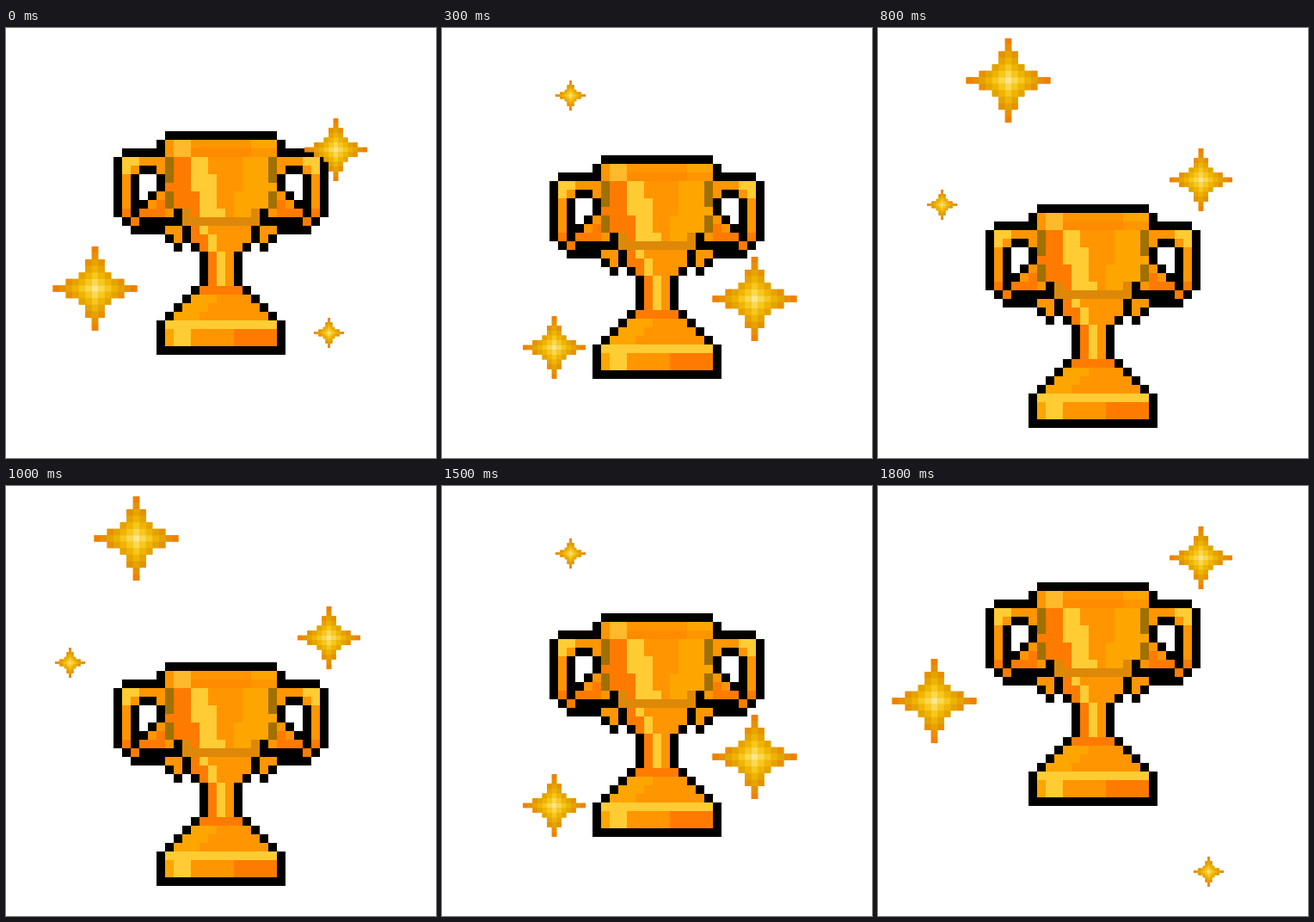
These frames come from a looping animation (500 px wide and 500 px high, 1900 ms). An HTML page:

```html
<!DOCTYPE html>
<html lang="en">
<head>
<meta charset="utf-8">
<title>Pixel trophy</title>
<style>
html, body { margin: 0; width: 100%; height: 100%; overflow: hidden; background: #fff; }
svg { display: block; width: 100vw; height: 100vh; }
</style>
</head>
<body>
<svg id="stage" viewBox="0 0 500 500"></svg>
<script>
const stage = document.getElementById('stage');

function add(parent, tag, attrs = {}) {
  const el = document.createElementNS('http://www.w3.org/2000/svg', tag);
  for (const k in attrs) el.setAttribute(k, attrs[k]);
  return parent.appendChild(el);
}

// Fills unit cells, one path per colour; color(x, y) may return nothing.
function paintCells(parent, [x0, x1], [y0, y1], color) {
  const paths = {};
  for (let y = y0; y <= y1; y++) {
    for (let x = x0; x <= x1; x++) {
      const fill = color(x, y);
      if (fill) paths[fill] = (paths[fill] || '') + `M${x} ${y}h1v1h-1z`;
    }
  }
  for (const fill in paths) add(parent, 'path', { d: paths[fill], fill });
}

const INK = '#000', BASE = '#ff9500', AMBER = '#ffa500', DEEP = '#ff7b00',
      GOLD = '#ffcc33', OLIVE = '#a07000', BAND = '#dd8808',
      RIM = '#ffb92b', RIM_SHADE = '#ff8c00';

// Trophy geometry: c and r are column and row, d the distance from the axis.
const AXIS = 12, FOOT = 25;

function halfWidth(r) {
  if (r < 1 || r >= FOOT) return -1;
  if (r < 9) return 6;
  if (r < 14) return 1 + Math.ceil((15 - r) / 2);
  return r < 18 ? 1 : Math.min(6, r - 16);
}

const inHole = (d, r) => r > 4 && r < 8 && d < 10 && d >= Math.max(8, r + 2);

const inHandle = (d, r) =>
  (r > 2 && r < 10 && d > 5 && d < 12) ||
  (r === 10 && d === 10) ||
  (r > 10 && d > 4 && d + r < 18);

const solid = (d, r) => d <= halfWidth(r) || inHandle(d, r);

function isInk(d, r) {
  const near = test => test(d - 1, r) || test(d + 1, r) || test(d, r - 1) || test(d, r + 1);
  const strap = d === 10 && r > 4 && r < 10;
  const underside = r === 11 && d > 6 && d < 11;
  const sole = r === FOOT && d < 8;
  return strap || underside || sole || (solid(d, r) ? near(inHole) : near(solid));
}

// Left of the shine is dark, right of it the given colour.
const shine = (c, from, to, right) => c < from ? DEEP : c <= to ? GOLD : right;

function shade(c, r, d) {
  if (d > 6) {
    if (r < 5 && d + 3 > 9 + r) return GOLD;
    return r > 8 || d + r === 15 ? DEEP : BASE;
  }
  if (r < 3) {
    if (c < 7) return BASE;
    if (c < 9) return RIM;
    if (c > 15) return r === 1 ? AMBER : BASE;
    return r === 1 ? BASE : RIM_SHADE;
  }
  if (r < 10) {
    if (d === 6 && r === 9) return BASE;
    if (d === 6 && r !== 6) return OLIVE;
    if (d === 4 && r === 9) return BAND;
    const slant = Math.floor((r - 3) / 2);
    const right = c >= (slant > 1 ? 14 : 15) ? AMBER : BASE;
    return shine(c, 9 + Math.floor(slant / 2), 10 + Math.ceil(slant / 2), right);
  }
  if (r === 10) return BAND;
  if (d > 4) return r < 18 ? BASE : footShade(c, r);
  if (r < 18) {
    const x = Math.min(12, 10 + Math.ceil((r - 11) / 2));
    return shine(c, x, x, BASE);
  }
  return footShade(c, r);
}

function footShade(c, r) {
  if (r === 18) return DEEP;
  if (r < 22) return c <= 30 - r ? AMBER : BASE;
  if (r === 22) return GOLD;
  if (c < 7) return AMBER;
  if (c < 9) return GOLD;
  return c < 14 ? BASE : DEEP;
}

function trophyColor(c, r) {
  const d = Math.abs(c - AXIS);
  if (inHole(d, r)) return null;
  if (isInk(d, r)) return INK;
  return solid(d, r) ? shade(c, r, d) : null;
}

const GLOW = ['#ffe68c', '#fbd850', '#f6c81e', '#f0b400', '#e4a400', '#e89000', '#f08000'];

function starColor(x, y) {
  const long = Math.max(Math.abs(x), Math.abs(y));
  const short = Math.min(Math.abs(x), Math.abs(y));
  const inside = short === 0 || (short === 1 && long < 5) || long < 3;
  return inside ? GLOW[long + short] : null;
}

function makeStar(cell, keys) {
  const el = add(stage, 'g');
  const art = add(el, 'g', { transform: 'translate(-.5 -.5)' });
  // A backing of one tone hides hairline gaps between cells.
  paintCells(art, [-6, 6], [-6, 6], (x, y) => starColor(x, y) && GLOW[4]);
  paintCells(art, [-6, 6], [-6, 6], starColor);
  return { el, cell, keys };
}

// Smooth curve through [step, x, y] keys.
function along(keys, s) {
  let i = 0;
  while (i < keys.length - 2 && s > keys[i + 1][0]) i++;
  const a = keys[i], b = keys[i + 1];
  const span = b[0] - a[0], u = (s - a[0]) / span;
  const slope = (n, k) => {
    const p = keys[Math.max(0, n - 1)], q = keys[Math.min(keys.length - 1, n + 1)];
    return (q[k] - p[k]) / (q[0] - p[0]) * span;
  };
  const u2 = u * u, u3 = u2 * u;
  return [1, 2].map(k =>
    a[k] * (2 * u3 - 3 * u2 + 1) + b[k] * (3 * u2 - 2 * u3) +
    slope(i, k) * (u3 - 2 * u2 + u) + slope(i + 1, k) * (u3 - u2));
}

const trophy = add(stage, 'g', { 'shape-rendering': 'crispEdges' });
paintCells(trophy, [0, 24], [0, FOOT], trophyColor);

const stars = [
  makeStar(5.6, [
    [0, 375.5, 83.5], [1, 383.5, 141.5], [2, 420, 260], [3, 292, 442],
    [4, 130.5, 371.5], [7, 149.5, 99.5], [10, 375.5, 176.5], [11, 411, 240]
  ]),
  makeStar(7.54, [
    [0, 65.5, 250], [1, 103.5, 303], [4, 363.5, 315],
    [7, 390.5, 288], [10, 151.5, 61], [11, 90, 100]
  ]),
  makeStar(2.7, [
    [0, 384.5, 448.5], [1, 375.5, 354.5], [4, 149.5, 78.5],
    [7, 40.5, 351.5], [10, 74.5, 205.5], [11, 92, 150]
  ])
];

const TICK = 100, TICKS = 19, TURN = 11;

// Steps run down and back up, with one step dropped every five ticks.
function stepAt(tick) {
  const n = (tick + 1 + Math.max(0, Math.floor((tick - 2) / 5))) % (2 * TURN);
  return n > TURN ? 2 * TURN - n : n;
}

// Nearly even travel that slows a little at both ends.
function lift(step) {
  const bend = 0.7, u = 2 * step / TURN - 1;
  return Math.round(162.8 + 50.5 * Math.sin(bend * u) / Math.sin(bend));
}

function draw(ms) {
  const step = stepAt(Math.floor(ms / TICK) % TICKS);
  trophy.setAttribute('transform', `translate(125 ${lift(step)}) scale(10)`);
  for (const { el, cell, keys } of stars) {
    const [x, y] = along(keys, step);
    el.setAttribute('transform', `translate(${x} ${y}) scale(${cell})`);
  }
}

let start;
function loop(now) {
  if (start === undefined) start = now;
  draw(now - start);
  requestAnimationFrame(loop);
}
draw(0);
requestAnimationFrame(loop);
</script>
</body>
</html>
```
